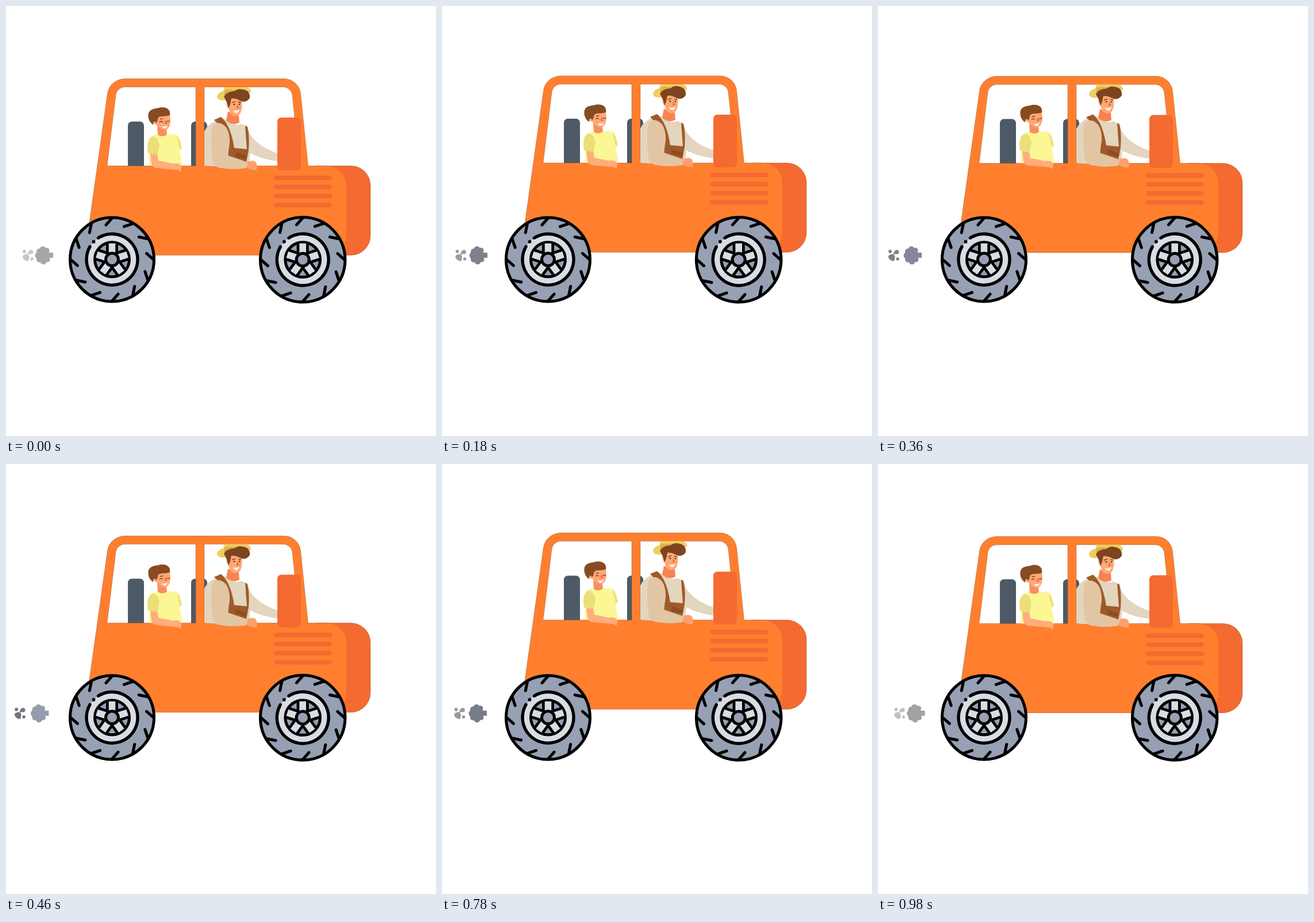
An HTML page that plays this animation: 748 px wide and 748 px high, repeating every 1 s.

```html
<!DOCTYPE html>
<html lang="en">
<head>
<meta charset="utf-8">
<title>Farm car</title>
<style>
  html, body { margin: 0; width: 100%; height: 100%; overflow: hidden; background: #fff; }
  svg { display: block; width: 100%; height: 100%; }
</style>
</head>
<body>
<svg viewBox="0 0 748 748">
  <defs>
    <clipPath id="pane"><path d="M345 141H512V300H345Z"/></clipPath>
    <g id="wheel">
      <circle r="73" fill="#98a0b4" stroke="#000" stroke-width="5"/>
      <g id="treads" stroke="#000" stroke-width="5" stroke-linecap="round"></g>
      <circle r="44" fill="#d8dde4"/>
      <path d="M-24 -37.5A44.5 44.5 0 1 1 -38.500 -22.300" fill="none" stroke="#000" stroke-width="5.400" stroke-linecap="round"/>
      <circle cx="-32" cy="-31" r="2.900"/>
      <circle r="30" fill="#98a0b4" stroke="#000" stroke-width="5"/>
      <g id="spokes"></g>
      <circle r="11" fill="#98a0b4" stroke="#000" stroke-width="5"/>
    </g>
  </defs>

  <g id="puff">
    <circle cx="64" cy="434" r="12"/>
    <circle cx="56" cy="434" r="5.500"/><circle cx="58" cy="427" r="5"/>
    <circle cx="64" cy="423.500" r="5.500"/><circle cx="71" cy="425" r="4.500"/>
    <circle cx="58" cy="441" r="5"/><circle cx="65" cy="444" r="5.500"/>
    <circle cx="72" cy="441" r="4.500"/><rect x="73" y="429" width="9" height="9" rx="1"/>
  </g>
  <g id="bits">
    <circle cx="35" cy="437" r="5.500"/><circle cx="31.500" cy="436" r="2.700"/><circle cx="37" cy="441" r="2.700"/>
    <circle cx="43.500" cy="428" r="3.800"/><circle cx="40.500" cy="429" r="2.300"/>
    <circle cx="32" cy="427" r="2.900"/><circle cx="45" cy="440" r="2.700"/><circle cx="39" cy="431" r="1.500"/>
  </g>

  <g id="car">
    <g fill="#4d5a66">
      <path d="M212 280V208A7 7 0 0 1 219 201H233A7 7 0 0 1 240 208V280Z"/>
      <path d="M322 280V208A7 7 0 0 1 329 201H343A7 7 0 0 1 350 208V280Z"/>
    </g>
    <g stroke="#4a2a18" stroke-opacity=".4" stroke-width=".7">
      <path d="M540 278H600A34 34 0 0 1 634 312V399.500A34 34 0 0 1 600 433.500H540Z" fill="#f46a30"/>
      <path fill-rule="evenodd" fill="#ff7f2f" d="M137 433.500L176.500 152A31 29 0 0 1 207 126.500H484A29 29 0 0 1 512.500 152L525.500 278H558V433.500Z
        M176 278H330V141H207A16 16 0 0 0 191 155Z M345 278H511L498 155A16 16 0 0 0 482 141H345Z"/>
    </g>
    <path d="M556 278.400H558A34 34 0 0 1 592 312V399A34 34 0 0 1 558 433H556Z" fill="#ff7f2f"/>

    <!-- child -->
    <path d="M263 209L279 212L280 224Q272 231 264 224Z" fill="#f98f5c"/>
    <path d="M258 190Q270 185 285 190Q288 205 282 213Q276 218 268 213Q263 210 261 206Q254 206 255 198Z" fill="#ffa775"/>
    <path d="M256 207C249 202 246 194 248 186C252 177 262 179 268 176.500C278 175 287 179 285 190C277 193 270 190 265 194C263 198 264 202 261 203C259 199 255 201 256 207Z" fill="#874b22"/>
    <path d="M277 198L281 205L276 205Z" fill="#f26a2e"/>
    <path d="M267 202Q270 199 273 202M280 201Q282 199 285 201M268 197L273 196" fill="none" stroke="#653516" stroke-width="1.200"/>
    <path d="M271 209Q276 211 281 208Q279 214 275 213Q272 212 271 209Z" fill="#fff"/>
    <path d="M262 223Q272 230 281 223L294 223Q302 224 303 236L306 247L302 250L307 278H249V240Q250 226 262 223Z" fill="#fcf795"/>
    <path d="M297 226Q303 230 306 247L302 250Z" fill="#eee27c"/>
    <path d="M251 257H263L265 269L290 274Q302 272 305 279L304 288L298 285L263 282Q254 281 253 274Z" fill="#ffad7c"/>
    <path d="M255 226Q266 230 267 242L264 258Q255 259 247 256Q243 232 255 226Z" fill="#ebdf78"/>

    <!-- driver -->
    <g clip-path="url(#pane)">
      <path d="M345 278V218Q354 200 378 196L389 200Q401 210 408 205Q420 207 424 222Q437 244 472 256V270Q446 267 425 256L423 274L365 279Z" fill="#e3d5be"/>
      <path d="M386 184L405 190L406 203Q393 209 383 199Z" fill="#f78351"/>
      <path d="M386 162Q394 154 409 163Q413 176 407 188Q399 195 390 187L387 178Q382 174 384 165Z" fill="#ffa775"/>
      <path d="M367 159Q367 151 378 148L381 139H421L422 143Q427 145 426 151Q407 150 387 163Q371 167 367 159Z" fill="#f0cd60"/>
      <path d="M379 153L381 146Q399 144 419 150L416 153Q399 150 383 159Z" fill="#dcb247"/>
      <path d="M379 158Q383 149 398 148Q404 142 416 146Q425 149 424 160Q419 168 410 166Q400 160 392 161L390 171L387 178Q385 167 379 158Z" fill="#7c451f"/>
      <path d="M402 171L406 178L401 178Z" fill="#f26a2e"/>
      <circle cx="397" cy="171" r="1.300" fill="#442415"/><circle cx="406" cy="171" r="1.200" fill="#442415"/>
      <path d="M393 168L399 166M404 167L409 168" stroke="#653516" stroke-width="1.300"/>
      <path d="M395 181Q400 184 406 180Q404 187 400 186Q396 185 395 181Z" fill="#fff"/>
      <path d="M362 198L374 193Q391 207 397 247L419 249L416 208L420 210Q424 227 422 251L418 272L386 262Q391 225 362 198Z" fill="#9f5a2b"/>
      <path d="M400 254L419 261L418 267L399 262Z" fill="#8f4c21"/>
      <path d="M418 271L429 269L434 271Q438 276 436 285Q430 287 419 281Z" fill="#ff9f6d"/>
      <path d="M359 209Q370 197 383 211Q390 222 389 239L386 260L421 272L418 282Q394 286 369 281Q359 277 359 264Q355 228 359 209Z" fill="#e2c6a3"/>
    </g>

    <rect x="472" y="194" width="41" height="92" rx="7" fill="#f46a30"/>
    <g id="vents" fill="#f46a30"></g>
  </g>

  <use href="#wheel" x="184.500" y="441"/>
  <use href="#wheel" transform="translate(516.200 441.300) scale(1.010)"/>
</svg>
<script>
  const $ = id => document.getElementById(id);
  const polar = (r, deg) => {
    const a = deg * Math.PI / 180;
    return [r * Math.cos(a), r * Math.sin(a)].map(v => v.toFixed(2));
  };
  const line = (p, q, attrs = '') =>
    `<line x1="${p[0]}" y1="${p[1]}" x2="${q[0]}" y2="${q[1]}" ${attrs}/>`;
  const repeat = (n, fn) => Array.from({ length: n }, (_, i) => fn(i)).join('');

  $('treads').innerHTML = repeat(12, i => line(polar(61, i * 30 - 100), polar(72, i * 30 - 90)));
  const spokes = (color, width) => repeat(5, i =>
    line(polar(8, i * 72 - 90), polar(28, i * 72 - 90), `stroke="${color}" stroke-width="${width}"`));
  $('spokes').innerHTML = spokes('#000', 21) + spokes('#d8dde4', 11.5);
  $('vents').innerHTML = repeat(4, i =>
    `<rect x="466" y="${295 + i * 15.75}" width="101" height="8" rx="4"/>`);

  // Each row: time in ms, then values.
  const bounce = [[0, 0], [260, -7.3], [510, 0], [760, -7.3], [1000, 0]];
  const drift = [[0, 0], [530, 1], [1000, 0]];
  const puffTint = [[0, 166, 166, 166], [100, 132, 134, 139], [280, 116, 122, 136],
    [460, 149, 156, 174], [530, 152, 160, 179], [620, 145, 151, 170],
    [780, 118, 124, 138], [1000, 166, 166, 166]];
  const bitTint = [[0, 198, 198, 198], [100, 168, 168, 168], [280, 140, 140, 144],
    [460, 112, 116, 128], [620, 122, 126, 140], [780, 152, 152, 155], [1000, 198, 198, 198]];

  function at(rows, t) {
    const i = rows.findIndex(r => r[0] > t);
    const a = rows[i - 1], b = rows[i];
    const k = (t - a[0]) / (b[0] - a[0]);
    return a.slice(1).map((v, j) => v + (b[j + 1] - v) * k);
  }
  function place(id, x, y) {
    $(id).setAttribute('transform', `translate(${x} ${y})`);
  }
  function draw(now) {
    const t = Math.floor((now % 1000) / 20) * 20;
    const [d] = at(drift, t);
    place('car', 0, at(bounce, t)[0]);
    place('puff', -8.7 * d, 0);
    place('bits', -16 * d, 0);
    $('puff').setAttribute('fill', `rgb(${at(puffTint, t).map(Math.round)})`);
    $('bits').setAttribute('fill', `rgb(${at(bitTint, t).map(Math.round)})`);
  }
  const start = performance.now();
  function tick() {
    draw(performance.now() - start);
    requestAnimationFrame(tick);
  }
  tick();
</script>
</body>
</html>
```
